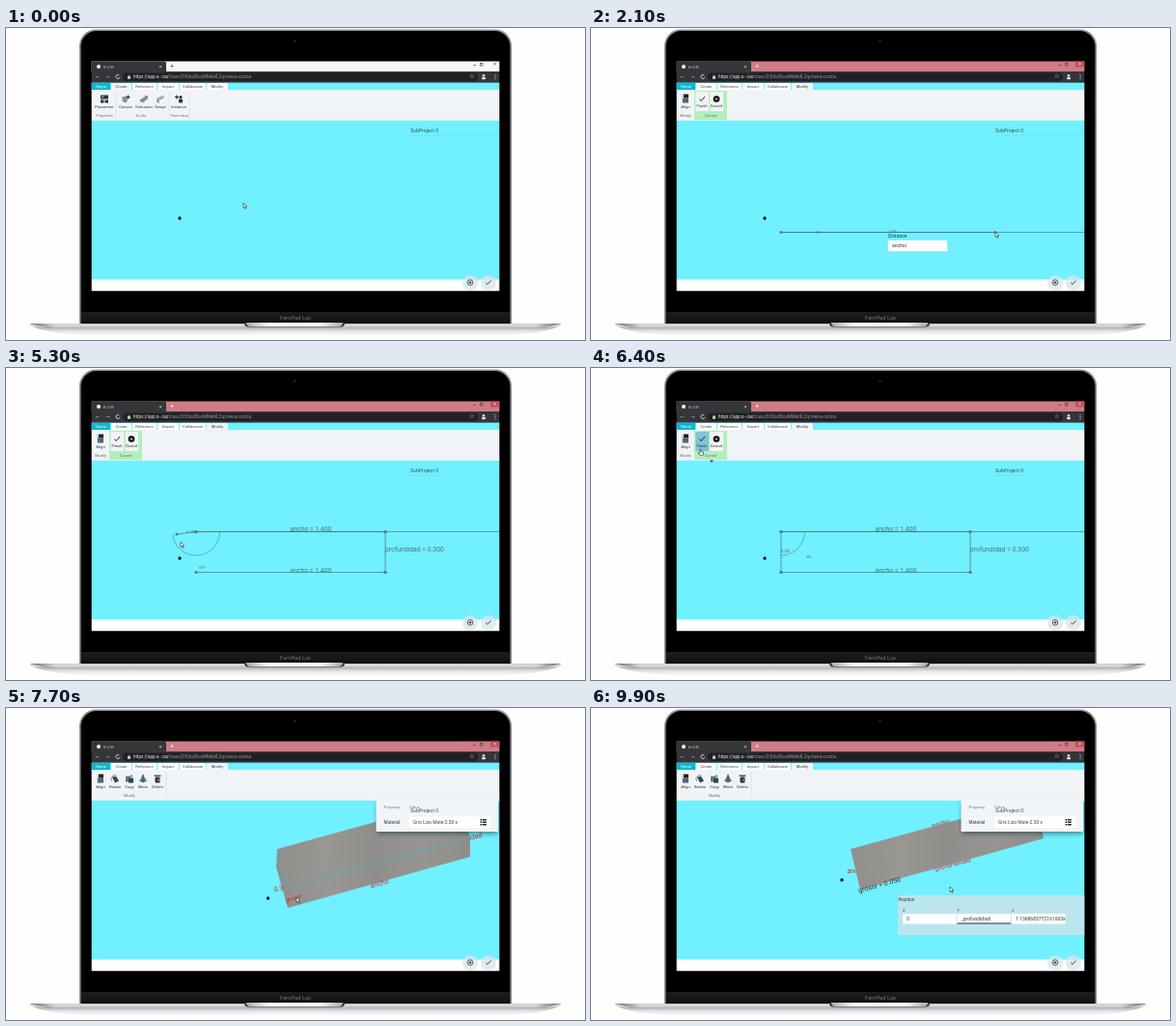
Recreate the animation shown at these times as an HTML page with a canvas. Size 600 by 323 pixels, loop 10 s.

```html
<!DOCTYPE html>
<html lang="en">
<head>
<meta charset="utf-8">
<title>Modelling a slab</title>
<style>
html, body { margin: 0; width: 100%; height: 100%; overflow: hidden; background: #fefefe; }
canvas { display: block; }
</style>
</head>
<body>
<canvas id="stage" width="600" height="323"></canvas>
<script>
const g = document.getElementById('stage').getContext('2d');
const LOOP = 10000, STEP = 100;
const INK = '#3f626e', CYAN = '#71f0ff', RED = '#d4242c', TILT = -0.27;

// ---- helpers ----
function rect(x, y, w, h, fill, r = 0) {
  g.fillStyle = fill;
  g.beginPath();
  g.roundRect(x, y, w, h, r);
  g.fill();
}
function trace(pts) {
  g.beginPath();
  pts.forEach(([x, y]) => g.lineTo(x, y));
}
function line(pts, color = INK, width = 0.6, dash = []) {
  trace(pts);
  g.strokeStyle = color;
  g.lineWidth = width;
  g.setLineDash(dash);
  g.stroke();
  g.setLineDash([]);
}
function poly(pts, fill) {
  trace(pts);
  g.fillStyle = fill;
  g.fill();
}
function disc(x, y, r, fill) {
  g.fillStyle = fill;
  g.beginPath();
  g.arc(x, y, r, 0, 7);
  g.fill();
}
function ring(x, y, r, color, width = 0.8, from = 0, to = 7) {
  g.strokeStyle = color;
  g.lineWidth = width;
  g.beginPath();
  g.arc(x, y, r, from, to);
  g.stroke();
}
function text(s, x, y, size, color = INK, align = 'left', angle = 0) {
  g.save();
  g.translate(x, y);
  g.rotate(angle);
  g.font = `${size}px Roboto, Arial, sans-serif`;
  g.textAlign = align;
  g.textBaseline = 'middle';
  g.fillStyle = color;
  g.fillText(s, 0, 0);
  g.restore();
}
function blend(x0, y0, x1, y1, ...colors) {
  const fill = g.createLinearGradient(x0, y0, x1, y1);
  colors.forEach((c, i) => fill.addColorStop(i / (colors.length - 1), c));
  return fill;
}
const mix = (a, b, k) => a.map((v, i) => v + (b[i] - v) * k);
const ramp = (t, a, b) => Math.min(1, Math.max(0, (t - a) / (b - a)));
const ease = k => k * k * (3 - 2 * k);

// Position along keys of the form [time, x, y].
function along(keys, t) {
  const i = keys.findIndex(k => k[0] > t);
  if (i < 0) return keys.at(-1).slice(1);
  const a = keys[i - 1], b = keys[i];
  return mix(a, b, ease(ramp(t, a[0], b[0]))).slice(1);
}
const typed = (s, t, start, perStep) =>
  s.slice(0, Math.max(0, Math.floor((t - start) / STEP * perStep) + 1));

// ---- laptop ----
function laptop() {
  rect(0, 0, 600, 323, '#fefefe');
  rect(76, 1.5, 448, 305, '#8d8f91', [17, 17, 0, 0]);
  rect(77.6, 3, 444.8, 303, '#000', [16, 16, 0, 0]);
  disc(299.5, 13.5, 1.2, '#26282b');
  rect(78, 294, 444, 11.5, blend(0, 294, 0, 305, '#1d1e20', '#101112'));
  text('FernPad Lux', 300, 300.3, 5.8, '#77797b', 'center');
  g.beginPath();
  g.moveTo(25, 306);
  g.lineTo(575, 306);
  g.lineTo(575, 308);
  g.quadraticCurveTo(552, 319, 490, 319);
  g.lineTo(110, 319);
  g.quadraticCurveTo(48, 319, 25, 308);
  g.fillStyle = blend(0, 305, 0, 319, '#b9bbbd', '#dcdedf', '#b4b6b8', '#dfe0e1', '#f2f2f3', '#fefefe');
  g.fill();
  [[25, 50], [575, 550]].forEach(([tip, end]) =>
    poly([[tip, 306], [end, 306], [end, 312]], blend(tip, 0, end, 0, 'rgba(70,72,74,.8)', 'rgba(70,72,74,0)')));
  rect(247, 305, 104, 4.5, '#333537', [0, 0, 4, 4]);
  rect(249, 305, 100, 4, blend(249, 0, 349, 0, '#a5a7a9', '#fff', '#f4f4f5', '#fff', '#a5a7a9'), [0, 0, 4, 4]);
}

// ---- browser ----
function browser(focused) {
  rect(88, 34, 424, 11, focused ? '#cf7c86' : '#f7f7f8');
  rect(88, 34, 78, 11, '#35363a', [0, 3, 0, 0]);
  disc(96, 40, 2, '#fff');
  text('K·U·R', 101, 40.3, 4.4, '#ccc');
  text('×', 160, 40, 6, '#ddd', 'center');
  text('+', 172, 40, 6.5, focused ? '#fff' : '#444', 'center');
  const button = focused ? '#5d3036' : '#333';
  line([[484, 38.5], [487, 38.5]], button);
  g.strokeRect(491.5, 36.5, 2.5, 2.5);
  if (focused) rect(502, 34, 10, 6.5, '#c5525c');
  text('×', 506.5, 38, 5, focused ? '#fff' : '#333', 'center');

  rect(88, 45, 424, 11.5, '#35363a');
  rect(121, 46.5, 368, 8.5, '#202124', 4);
  text('←', 95, 50.5, 6.5, '#eee', 'center');
  text('→', 105.5, 50.5, 6.5, '#eee', 'center');
  ring(116, 50.5, 2, '#eee', 0.8, 0.3, 5.4);
  rect(126, 50, 3, 2.7, '#ccc');
  ring(127.5, 50, 1, '#ccc', 0.6, 3.1, 6.3);
  text('https://app.o-·.iac', 132, 50.6, 4.6, '#eee');
  text('/class/D30ta38uxMMebfL2q/mesa-cocina', 167, 50.6, 4.6, '#999');
  text('☆', 483, 50.4, 6.5, '#eee', 'center');
  disc(495, 49.3, 1.3, '#ddd');
  rect(493, 50.8, 4, 2.5, '#ddd', 1);
  [48.5, 50.5, 52.5].forEach(y => disc(507, y, 0.6, '#ddd'));
}

function tabs(active) {
  rect(88, 56.5, 424, 8, CYAN);
  rect(88, 57, 20, 7.5, '#0fb7cf');
  text('Home', 98.5, 60.7, 4.1, '#fff', 'center');
  [['Create', 109, 21], ['Reference', 131, 25], ['Import', 157, 22], ['Collaborate', 180, 27], ['Modify', 208, 22]]
    .forEach(([name, x, w]) => {
      rect(x, 57, w, 7.5, name === active ? '#f1f4f7' : '#fff');
      text(name, x + w / 2, 60.7, 4.1, '#444', 'center');
    });
}

// ---- ribbon ----
const plus = (x, y, r = 2) => {
  line([[x - r, y], [x + r, y]], '#222', r / 1.7);
  line([[x, y - r], [x, y + r]], '#222', r / 1.7);
};
const icons = {
  Parameter(x, y) {
    rect(x - 4, y - 4, 8, 4, '#26352c');
    rect(x - 3, y - 3, 2.5, 1.5, '#7fb08a');
    rect(x - 4, y + 1, 3.5, 3, '#333');
    rect(x + .5, y + 1, 3.5, 3, '#333');
  },
  Convex(x, y) {
    poly([[x - 4, y - 2], [x, y - 3], [x + 2, y], [x + 1, y + 4], [x - 3, y + 3]], '#8b9299');
    plus(x + 2.5, y - 2);
  },
  Extrusion(x, y) {
    poly([[x - 4, y + 1], [x + 2, y - 4], [x + 4, y - 3], [x + 4, y], [x - 1, y + 4], [x - 4, y + 3]], '#9ba1a6');
    line([[x - 4, y + 1], [x - 1, y + 1], [x + 4, y - 3]], '#555', 0.7);
  },
  Swept(x, y) {
    line([[x - 3, y + 3], [x - 2, y], [x + 1, y - 1], [x + 3, y - 3]], '#a6abb0', 3);
    line([[x - 4, y + 2], [x - 1, y + 4]], '#555', 0.7);
  },
  Instance(x, y) {
    plus(x - 2, y - 2);
    disc(x + 2, y - 2, 1.5, '#222');
    rect(x, y, 4, 4, '#333', 1);
  },
  Align(x, y) {
    rect(x - 2, y - 5, 5, 4, '#222');
    rect(x - 3, y - 1, 6, 5, '#59636b');
    line([[x - 3, y - 5], [x - 3, y + 4]], '#37a7c2');
  },
  Rotate(x, y) {
    poly([[x - 3, y - 2], [x + 1, y - 3], [x + 4, y + 2], [x, y + 4]], '#3c464d');
    ring(x, y, 4, '#4c99b0', 0.9, 2.5, 5);
  },
  Copy(x, y) {
    rect(x - 4, y - 3, 5, 6, '#69757d');
    rect(x - 1, y - 1, 5, 5, '#30424c');
    disc(x + 2, y - 3, 1.3, '#37a7c2');
  },
  Move(x, y) {
    poly([[x, y - 5], [x + 2, y - 1], [x + 4, y + 2], [x, y + 4], [x - 4, y + 2], [x - 2, y - 1]], '#5c7784');
    line([[x, y - 5], [x, y + 3]], '#263840');
  },
  Delete(x, y) {
    rect(x - 2.5, y - 2, 5, 6, '#333', 1);
    rect(x - 3.5, y - 4, 7, 1.3, '#333');
    disc(x + 1, y + 1, 1, '#8a979d');
  },
  Finish(x, y) { line([[x - 2.6, y], [x - .8, y + 2], [x + 3, y - 2.5]], '#111', 0.9); },
  Cancel(x, y) {
    disc(x, y, 3.3, '#000');
    line([[x - 1.2, y - 1.2], [x + 1.2, y + 1.2]], '#fff', 0.9);
    line([[x + 1.2, y - 1.2], [x - 1.2, y + 1.2]], '#fff', 0.9);
  }
};
const ribbons = {
  create: {
    tools: [['Parameter', 102], ['Convex', 124], ['Extrusion', 143], ['Swept', 160], ['Instance', 179]],
    groups: [['Properties', 102], ['In situ', 140], ['From class', 180]], bars: [114, 169, 190]
  },
  sketch: {
    tools: [['Align', 98], ['Finish', 115], ['Cancel', 130]],
    groups: [['Modify', 98], ['Current', 124]], bars: []
  },
  modify: {
    tools: [['Align', 98], ['Rotate', 113], ['Copy', 128], ['Move', 142], ['Delete', 157]],
    groups: [['Modify', 128]], bars: [166]
  }
};
function ribbon(mode, hover) {
  tabs(mode === 'create' ? 'Create' : 'Modify');
  rect(88, 64, 424, 31.7, '#f1f4f7');
  if (mode === 'sketch') {
    rect(107, 65, 34, 30, '#b3efbc');
    rect(108.5, 66, 13.5, 20, hover === 'Finish' ? '#7fc4d8' : '#f1f4f7');
    rect(123.5, 66, 13.5, 20, '#f1f4f7');
  } else if (hover) {
    const x = ribbons[mode].tools.find(k => k[0] === hover)[1];
    rect(x - 8, 66, 16, 20, '#c9e6ef');
  }
  const { tools, groups, bars } = ribbons[mode];
  tools.forEach(([name, x]) => {
    icons[name](x, 73.5);
    text(name, x, /Finish|Cancel/.test(name) ? 80.3 : 82.2, 4.2, '#333', 'center');
  });
  groups.forEach(([name, x]) => text(name, x, 91.3, 3.8, '#666', 'center'));
  bars.forEach(x => line([[x, 66], [x, 94]], '#d5dade', 0.6));
}

// ---- drawing area ----
function view() {
  rect(88, 95, 424, 166, CYAN);
  rect(88, 260.6, 424, 13, '#fff');
  line([[418, 111], [510, 111]], '#66d9e8', 0.5);
}
function overlay() {
  text('SubProject 0', 419, 106.3, 5.15, '#3d555e');
  [481, 500].forEach(x => disc(x, 264, 8, 'rgba(215,230,234,.75)'));
  ring(481, 263.5, 2.8, '#222', 0.7);
  plus(481, 263.5, 1.4);
  line([[497.2, 263.6], [499, 265.4], [502.6, 261.4]], '#222', 0.8);
}
const node = ([x, y]) => disc(x, y, 1.6, '#5f7c87');

// Segment being drawn, with its guide, angle and length.
function segment(a, b) {
  const [dx, dy] = [b[0] - a[0], b[1] - a[1]], angle = Math.atan2(dy, dx);
  const deg = Math.abs(Math.round(angle * 180 / Math.PI));
  line([a, [511, a[1]]], '#2f6f98');
  line([a, b]);
  if (deg) ring(...a, 24.5, '#4b8796', 0.6, Math.min(0, angle), Math.max(0, angle));
  text((deg > 100 ? 360 - deg : deg) + '°', a[0] + 37 * Math.cos(angle / 2), a[1] + 37 * Math.sin(angle / 2), 3.8, '#7a5058');
  text((Math.hypot(dx, dy) / 140).toFixed(3), a[0] + dx / 2, a[1] + dy / 2 - 1, 3.6, '#567');
  node(a);
  node(b);
}
function edge(a, b, label, x, y) {
  line([a, b]);
  text(label, x, y, 6.8, '#4c737f');
  node(a);
  node(b);
}
function distance(x, y, value) {
  text('Distance', x, y, 5, '#26343b');
  rect(x - .5, y + 3.5, 62, 12, '#cfe4e8');
  rect(x, y + 4, 61, 11, '#fff');
  text(value + '|', x + 4, y + 9.5, 5, '#333');
}

const P = [[197, 211.5], [393, 211.5], [393, 169.5], [197, 169.5]];
const lastPoint = [[4900, 140, 169.5], [5300, 177, 172], [5600, ...P[0]]];
function sketch(t, mouse) {
  if (t < 1200) return;
  if (t < 2200) segment(P[0], [mouse[0], P[0][1]]);
  else edge(P[0], P[1], 'ancho = 1.400', 294.5, 209.5);
  if (t >= 2200 && t < 3800) segment(P[1], [393, mouse[1]]);
  if (t >= 3800) edge(P[1], P[2], 'profundidad = 0.300', 393, 188);
  if (t >= 3800 && t < 4900) segment(P[2], [mouse[0], P[2][1]]);
  if (t >= 4900) {
    segment(P[3], along(lastPoint, t));
    edge(P[2], P[3], 'ancho = 1.400', 294.5, 167.3);
  }
  if (t >= 1700 && t < 2200) distance(308, 216, typed('ancho', t, 1700, 1));
  if (t >= 3000 && t < 3800) distance(295, 173, typed('profundidad', t, 3200, 2));
  if (t >= 4300 && t < 4900) distance(266, 174, typed('ancho', t, 4400, 1));
}

const CUT = 8300;
const flat = [P[3], P[2], P[1], P[1], P[0], P[3]];
const tilted = [[281, 146], [470, 94], [481, 134], [481, 154], [292, 207], [280, 165]];
const front = [[269, 146], [459, 94], [469, 135], [469, 135], [279, 188], [269, 146]];
function slab(t) {
  const turn = ramp(t, 7000, 7400), cut = t >= CUT;
  const shape = cut ? front : flat.map((p, i) => mix(p, tilted[i], ease(turn)));
  if (cut) {
    text('ancho', 362, 120, 7, RED, 'center', TILT);
    text('ancho', 265.5, 169, 7, RED);
    text('profundidad', 375, 162, 7, RED, 'center', TILT);
  } else if (turn === 1) text('profundidad', 475, 136.5, 7, RED, 'center', TILT);
  poly(shape, blend(...shape[0], ...shape[2], '#918f8c', '#999794', '#908e8b', '#979592', '#8f8d8a'));
  if (cut) text('grosor = 0.050', 299, 183.5, 7, '#3b2b30', 'center', TILT);
  else if (turn === 1) {
    line([[281, 147], [291, 186], [481, 134]], '#27bfd3', 0.9, [4, 2]);
    text('0.3', 278, 188.5, 7, RED, 'left', TILT);
    text('ancho', 387, 182, 7, RED, 'center', TILT);
    text('grosor', 298, 197, 6, RED, 'center', TILT);
  }
  if (t < 7000) distance(295, 224, typed('grosor', t, 6600, 2));
}

function materialPanel() {
  g.save();
  g.shadowColor = 'rgba(0,40,50,.55)';
  g.shadowBlur = 5;
  g.shadowOffsetY = 2;
  rect(383.5, 96, 126.5, 32, '#f2f5f8');
  g.restore();
  rect(383.5, 94, 128, 2, '#f1f4f7');
  text('Property', 391.5, 102.7, 4.4, '#777');
  text('Value', 418, 102.7, 4.4, '#777');
  text('Material', 391.5, 118.3, 4.6, '#333');
  rect(418, 112.5, 84, 11.5, '#fff');
  text('Gris Liso Mate-2.50 x', 422, 118.3, 4.9, '#444');
  [115.8, 118.3, 120.8].forEach(y => {
    rect(491.5, y - .8, 1.6, 1.6, '#222');
    rect(493.8, y - .7, 4, 1.4, '#222');
  });
}
function positionPanel(value, active) {
  rect(318, 194, 194, 41, 'rgba(205,228,233,.82)');
  text('Position', 318.5, 198.3, 4.6, '#333');
  [['X', 323, '0'], ['Y', 379.5, value], ['Z', 436, '1.1368683772161603x']].forEach(([name, x, v]) => {
    text(name, x, 210.3, 4, '#444');
    rect(x, 213, 55.5, 10.5, '#fff');
    text(v, x + 4, 218.3, 5, '#333');
  });
  if (active) line([[379.5, 223], [435, 223]], '#223', 1);
}

// ---- pointer ----
const path = [
  [0, 246, 181], [200, 246, 181], [600, 143, 78], [800, 143, 78], [1100, 197, 211], [1300, 197, 211],
  [1700, 419, 211], [2200, 419, 211], [2700, 393, 126], [3800, 393, 126], [4200, 140, 169.5],
  [4900, 140, 169.5], [5300, 181, 180], [5600, 197, 211], [5800, 197, 211], [6300, 113, 84],
  [6600, 113, 84], [7200, 301, 196], [7800, 301, 196], [8200, 290, 178], [8600, 142, 76],
  [8700, 142, 76], [9100, 400, 217], [9300, 400, 217], [9700, 372, 185]
];
function pointer([x, y], hand) {
  const shape = hand
    ? [[0, 0], [1, 0], [1, 2.5], [3.5, 3], [3.5, 6], [0, 6.5], [-2, 3.5], [0, 4]]
    : [[0, 0], [0, 5.3], [1.3, 4.2], [2.2, 6.2], [3, 5.8], [2.2, 3.9], [3.8, 3.8]];
  const pts = shape.map(([a, b]) => [x + a, y + b]);
  poly(pts, '#fff');
  line([...pts, pts[0]], '#222');
}

const dotPath = [[0, 180, 197], [7000, 180, 197], [7400, 271.5, 197], [CUT, 271.5, 197], [CUT, 260, 178]];

function draw(t) {
  const mouse = along(path, t);
  const mode = t < 800 ? 'create' : t < 7100 ? 'sketch' : 'modify';
  const overRibbon = mouse[1] < 90;
  const hover = overRibbon ? { create: 'Extrusion', sketch: t > 6000 && 'Finish', modify: 'Move' }[mode] : '';
  laptop();
  g.save();
  g.beginPath();
  g.rect(88.7, 34.5, 422.6, 237.8);
  g.clip();
  view();
  if (t < 6600) sketch(t, mouse);
  else slab(t);
  disc(...along(dotPath, t), 1.7, '#111');
  browser(t >= 700);
  ribbon(mode, hover);
  if (hover === 'Finish') poly([[123, 95.5], [127, 95.5], [125, 98]], '#345');
  if (t >= 7200) materialPanel();
  if (t >= 8700) positionPanel(t < 9300 ? '0' : typed('_profundidad', t, 9300, 2) + '|', t >= 9200);
  overlay();
  pointer(mouse, overRibbon);
  g.restore();
}

function tick(now) {
  draw(Math.floor(now % LOOP / STEP) * STEP);
  requestAnimationFrame(tick);
}
tick(performance.now());
</script>
</body>
</html>
```
